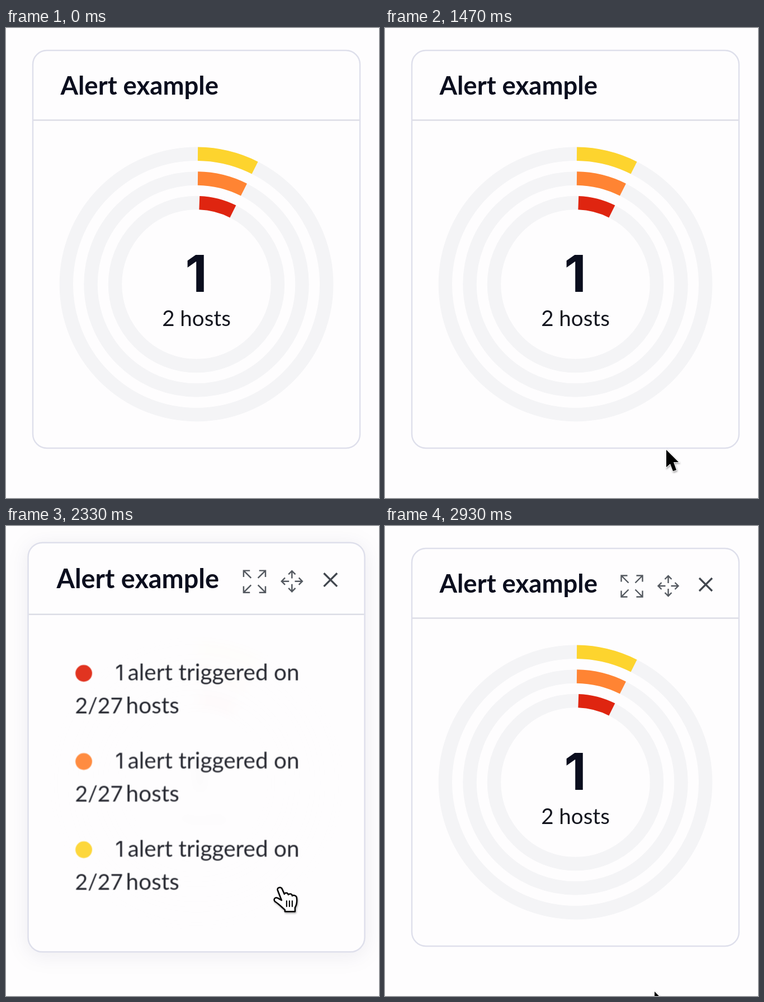
Animation of 667x839 px, one loop 2.99 s. Source, as an HTML page:

```html
<!DOCTYPE html>
<html lang="en">
<head>
<meta charset="utf-8">
<title>Alert widget</title>
<style>
  html, body { margin: 0; width: 100%; height: 100%; overflow: hidden; background: #fefdfe; }
  svg { display: block; width: 100%; height: 100%; }
  text { font-family: Lato, sans-serif; font-size: 39.4px; fill: #14161f; }
  .title { font-size: 45.5px; font-weight: 700; fill: #0b0e1e; }
  .count { font: 700 91px Inter, sans-serif; fill: #0b0e1e; }
  .hosts { font-size: 38.5px; }
  .digit { font: 37px Inter, sans-serif; }
  .ratio { font-size: 38px; }
  .middle { text-anchor: middle; }
  #icons, .ring, .arc { fill: none; }
  .ring { stroke: #f4f4f6; stroke-width: 24.4; }
  .arc { stroke-width: 24.4; }
  #cursor { filter: drop-shadow(1px 2px 1.5px rgba(0, 0, 0, .35)); }
</style>
</head>
<body>
<svg viewBox="0 0 667 839">
  <g id="card">
    <rect id="frame" x="48" y="40" width="585" height="710" rx="25" fill="#fefdfe" stroke="#dedfeb" stroke-width="2.4"/>
    <path d="M49 164.5H632" stroke="#dcdde6" stroke-width="2.4"/>
    <text class="title" x="97.5" y="119">Alert example</text>
    <g id="icons" stroke="#545960" stroke-width="2.4">
      <g id="expand" transform="translate(441.5 107.5)"></g>
      <g id="move" transform="translate(506.5 107)"></g>
      <path d="M562 93L585 116M585 93L562 116" stroke="#41464e" stroke-width="3.2"/>
    </g>
    <g id="chart">
      <g id="rings"></g>
      <text class="count middle" x="340" y="471">1</text>
      <text class="hosts middle" x="340.5" y="532">2 hosts</text>
    </g>
    <g id="list"></g>
  </g>
  <g id="cursor">
    <path id="arrow" d="M0 0V31L7 25L12 38L18 36L13 22H22Z" stroke="#fff" stroke-width="2" paint-order="stroke"/>
    <g id="hand" fill="#fff" stroke="#000" stroke-width="2.5" stroke-linejoin="round" stroke-linecap="round">
      <path d="M-4 5C-6 0 2 -2 4 3L8 12C9 9 14 9 15 13C18 10 22 12 22 15C25 13 30 15 30 19C31 27 30 31 27 36V43H9V40C4 36 -1 30 -9 25C-12 21 -9 17 -4 19L3 23Z"/>
      <path d="M12 24V34M17 24V34M22 24V34" stroke-width="2.1"/>
    </g>
  </g>
</svg>
<script>
const LOOP = 2990, FPS = 15;
const RED = '#df2510', ORANGE = '#ff8433', YELLOW = '#fdd42e';
const $ = id => document.getElementById(id);

// Each icon is one arm repeated in four directions.
const spin = path => [0, 90, 180, 270].map(a => `<path d="${path}" transform="rotate(${a})"/>`).join('');
$('expand').innerHTML = spin('M-19 -8V-19H-8M-19 -19L-6 -6');
$('move').innerHTML = spin('M0 -5V-18M-6 -12L0 -18L6 -12');

// A grey track with a coloured arc that starts a little right of the vertical.
function ring(radius, color, gap) {
  const point = angle => `${340.5 + radius * Math.sin(angle)} ${457.5 - radius * Math.cos(angle)}`;
  return `<circle class="ring" cx="340.5" cy="457.5" r="${radius}"/>
    <path class="arc" stroke="${color}" d="M${point(gap / radius)}A${radius} ${radius} 0 0 1 ${point(0.466)}"/>`;
}
$('rings').innerHTML = ring(232.7, YELLOW, 2.5) + ring(189, ORANGE, 2.5) + ring(145.5, RED, 5.3);

$('list').innerHTML = [RED, ORANGE, YELLOW].map((color, i) => `
  <g transform="translate(0 ${153 * i})">
    <circle cx="144.7" cy="266.7" r="14.5" fill="${color}"/>
    <text class="digit" x="199.5" y="278.5">1</text>
    <text x="221" y="278.5">alert triggered on</text>
    <text class="ratio" x="129.5" y="336.5">2/27</text>
    <text x="218" y="336.5">hosts</text>
  </g>`).join('');

// Eased step from 0 to 1 between two times.
function ramp(t, from, to) {
  const u = Math.min(1, Math.max(0, (t - from) / (to - from)));
  return u * u * (3 - 2 * u);
}

// The pointer's way points; it rests between the fourth and the fifth.
const route = [
  { t: 1200, x: 533, y: 831 },
  { t: 1600, x: 488, y: 714 },
  { t: 1680, x: 489, y: 656 },
  { t: 1860, x: 490, y: 644 },
  { t: 2330, x: 490, y: 644 },
  { t: 2670, x: 472, y: 766 },
  { t: 2930, x: 482, y: 831 },
];

function pointerAt(t) {
  const next = Math.max(1, route.findIndex(p => p.t > t));
  const end = t >= route.at(-1).t ? route.length - 1 : next;
  const a = route[end - 1], b = route[end];
  const u = Math.min(1, Math.max(0, (t - a.t) / (b.t - a.t)));
  return [a.x + (b.x - a.x) * u, a.y + (b.y - a.y) * u];
}

function draw(t) {
  const hover = ramp(t, 1470, 1690) - ramp(t, 2690, 2880);
  const fade = ramp(t, 1470, 1660) - ramp(t, 2680, 2860);
  const blur = 11 * (ramp(t, 1470, 1660) - ramp(t, 2680, 2790));

  $('card').setAttribute('transform',
    `translate(340.5 395) scale(${1 + 0.029 * hover}) translate(-340.5 -395)`);
  $('frame').style.filter = hover ? `drop-shadow(0 5px 18px rgba(20, 20, 50, ${0.07 * hover}))` : 'none';
  $('icons').style.display = t > 1500 ? '' : 'none';
  $('list').style.opacity = 0.93 * (ramp(t, 1490, 1760) - ramp(t, 2680, 2790));
  $('chart').style.opacity = 1 - 0.985 * fade;
  $('chart').style.filter = blur ? `blur(${blur}px)` : 'none';

  const pointing = t > 1500 && t < 2700;
  $('cursor').style.display = t > 1190 ? '' : 'none';
  $('cursor').setAttribute('transform', `translate(${pointerAt(t)})`);
  $('hand').style.display = pointing ? '' : 'none';
  $('arrow').style.display = pointing ? 'none' : '';
}

const start = performance.now();
function tick() {
  const elapsed = (performance.now() - start) % LOOP;
  draw(Math.floor((elapsed + 4) * FPS / 1000) * 1000 / FPS);
  requestAnimationFrame(tick);
}
tick();
</script>
</body>
</html>
```
